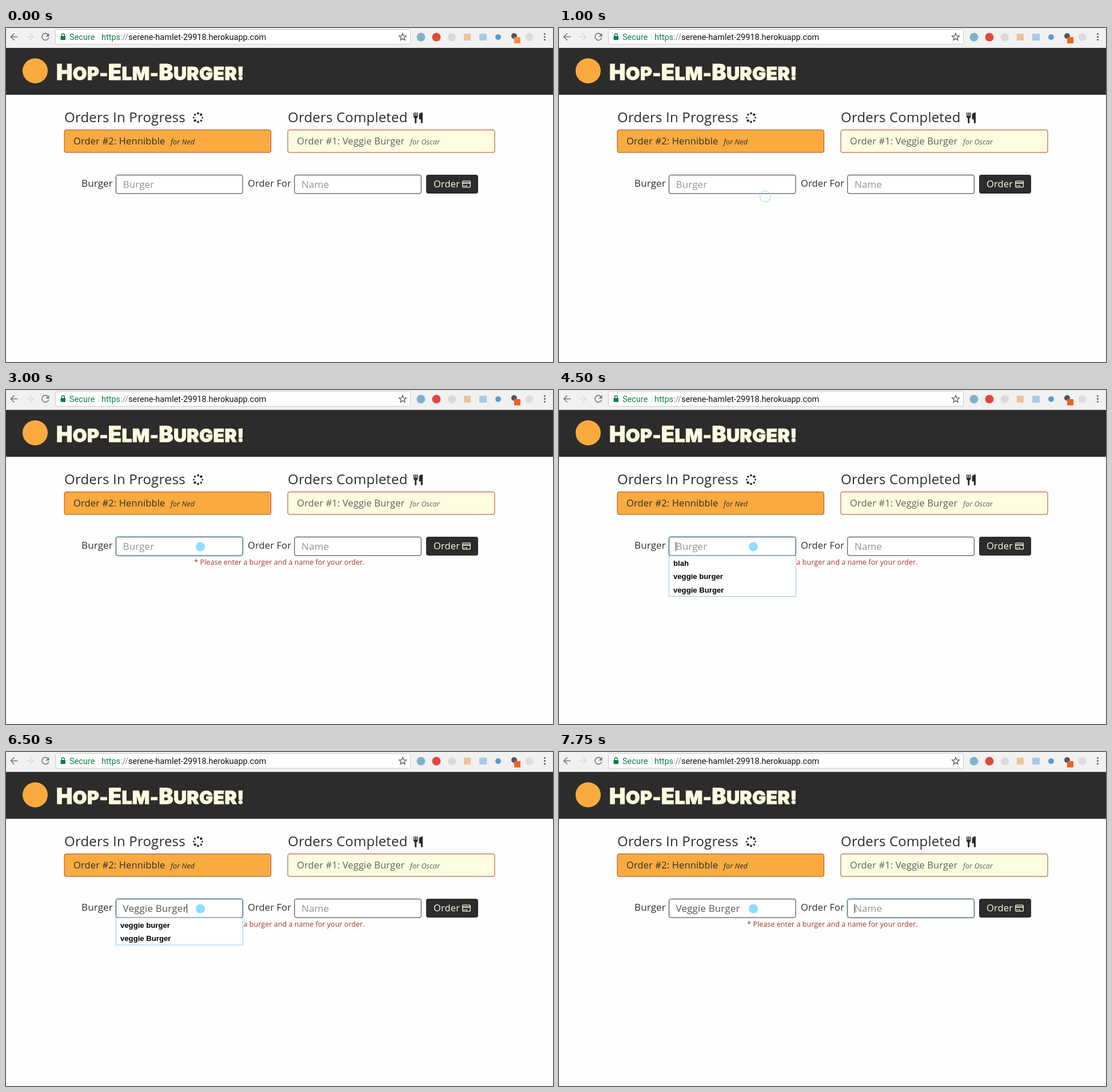
Recreate the animation shown at these times as an HTML page. Size 957 by 585 pixels, loop 8000 ms.

```html
<!DOCTYPE html>
<html lang="en">
<head>
<meta charset="utf-8">
<title>Burger orders</title>
<style>
  html, body { margin: 0; width: 100%; height: 100%; overflow: hidden; background: #fefefe; }
  svg { display: block; width: 957px; height: 585px; }
  text { font: 500 16.5px "Open Sans", "Noto Sans", sans-serif; letter-spacing: .008em; fill: #2c2c2c; }
  .url text { font: 14.5px Roboto, Arial, sans-serif; letter-spacing: 0; }
  .brand { font: 900 32px Inter, Roboto, sans-serif; letter-spacing: .01em; fill: #fdfbdf; stroke: #fdfbdf; stroke-width: .9; }
  .brand tspan { font-size: 38px; }
  .head { font-size: 24px; }
  .for { font-size: 12.5px; font-style: italic; }
  .field { font-size: 17px; }
  .hint { fill: #949494; }
  .error { font-size: 12.4px; fill: #a23328; text-anchor: middle; }
  .list text { font: bold 13.15px "Liberation Sans", Arial, sans-serif; letter-spacing: 0; fill: #000; }
  .input { fill: #fff; stroke: #2c2c2c; }
  .focus { stroke: #2b3d4d; filter: drop-shadow(0 0 2.2px rgba(102, 185, 233, .7)); }
  .line { fill: none; stroke: #737577; stroke-width: 1.6; }
</style>
</head>
<body>
<svg viewBox="0 0 957 585">
  <!-- browser bar -->
  <rect width="957" height="35" fill="#f1f1f1"/>
  <rect y="34" width="957" height="1" fill="#d2d2d2"/>
  <rect x="86.5" y="2.5" width="621" height="26" rx="3" fill="#fff" stroke="#cbcbcb"/>
  <path class="line" d="M20.5 15.5H9M14.5 9.5l-6 6 6 6"/>
  <path class="line" d="M35.5 15.5H47M41.5 9.5l6 6-6 6" style="stroke:#d9d9d9"/>
  <path class="line" d="M73.5 11.5a6 6 0 1 0 1.2 5.5"/>
  <path d="M75.5 9v6h-6z" fill="#737577"/>
  <rect x="95.5" y="14" width="8.5" height="7" rx="1" fill="#0b8043"/>
  <path d="M97.3 14v-1.5a2.500 2.500 0 0 1 5 0V14" fill="none" stroke="#0b8043" stroke-width="1.4"/>
  <g class="url">
    <text x="111" y="21" style="fill:#0b8043">Secure</text>
    <rect x="161.5" y="8" width="1" height="16" fill="#e2e2e2"/>
    <text x="167" y="21" style="fill:#111"><tspan fill="#0b8043">https</tspan><tspan fill="#8a8a8a">://</tspan>serene-hamlet-29918.herokuapp.com</text>
  </g>
  <path id="star" fill="none" stroke="#5f6163" stroke-width="1.4"/>
  <circle cx="726" cy="16" r="7.5" fill="#7fb0cc"/>
  <circle cx="753" cy="16" r="7.5" fill="#e0483e"/>
  <circle cx="780" cy="16" r="7" fill="#d9d9d9"/>
  <rect x="801" y="10" width="12" height="12" fill="#ecc396"/>
  <rect x="828" y="10" width="13" height="12" fill="#a9c8e6"/>
  <circle cx="861" cy="16" r="5" fill="#5b9ad6"/>
  <circle cx="889" cy="14" r="5" fill="#555"/>
  <rect id="badge" x="889" y="16" width="11" height="11"/>
  <circle cx="915.5" cy="16" r="7" fill="#dcdcdc"/>
  <g fill="#5f6163"><circle cx="942.5" cy="10.5" r="1.6"/><circle cx="942.5" cy="15.5" r="1.6"/><circle cx="942.5" cy="20.5" r="1.6"/></g>

  <!-- page header -->
  <rect y="35" width="957" height="82" fill="#2c2c2c"/>
  <circle cx="51" cy="75" r="22" fill="#fbab3e"/>
  <text class="brand" x="88" y="90.5"><tspan>H</tspan>OP-<tspan>E</tspan>LM-<tspan>B</tspan>URGER!</text>

  <!-- orders -->
  <text class="head" x="102" y="165">Orders In Progress</text>
  <g id="spinner" fill="#2c2c2c"></g>
  <text class="head" x="493" y="165">Orders Completed</text>
  <g fill="#2c2c2c">
    <path d="M713 148h1.6v6h1.2v-6h1.8v6h1.2v-6h1.6v7.500q0 2-2.200 2.600V165.500q0 1.500-1.500 1.500t-1.500-1.500V158.100q-2.200-.6-2.200-2.600z"/>
    <path d="M729 148v17.500q0 1.500-1.600 1.500t-1.600-1.500V160h-3.300v-7.500q0-4.500 6.500-4.500z"/>
  </g>
  <g stroke="#ae431f">
    <rect x="102" y="178.5" width="361.5" height="39.5" rx="3" fill="#f9ab3f"/>
    <rect x="493" y="178.5" width="362" height="39.5" rx="3" fill="#fcfce1"/>
  </g>
  <text x="118" y="203.5">Order #2: Hennibble</text>
  <text class="for" x="288" y="203.5">for Ned</text>
  <g opacity=".75">
    <text x="509" y="203.5">Order #1: Veggie Burger</text>
    <text class="for" x="707" y="203.5">for Oscar</text>
  </g>

  <!-- form -->
  <text class="field" x="132" y="278">Burger</text>
  <text x="423" y="278">Order For</text>
  <rect id="box1" class="input" x="192.5" y="257.5" width="221.5" height="32.5" rx="3"/>
  <rect id="box2" class="input" x="504.8" y="257.5" width="221.5" height="32.5" rx="3"/>
  <text id="hint" class="field hint" x="204.5" y="279.5">Burger</text>
  <text id="typed" class="field" x="204.5" y="279.5" style="fill:#555"></text>
  <text class="field hint" x="517" y="279.5">Name</text>
  <rect x="735" y="257" width="91" height="33" rx="4" fill="#2c2c2c"/>
  <text x="748" y="279" style="fill:#fdfbdf">Order</text>
  <rect x="798.7" y="268.2" width="13.6" height="10.6" rx="1" fill="none" stroke="#fdfbdf" stroke-width="1.3"/>
  <path d="M798.5 271.5h14M800.5 276.3h2M804 276.3h3" stroke="#fdfbdf" stroke-width="1.8"/>
  <text id="error" class="error" x="478.5" y="305.5">* Please enter a burger and a name for your order.</text>

  <!-- suggestions, caret and pointer -->
  <g id="list" class="list">
    <rect id="frame" x="192.5" y="290.5" width="222" fill="#fff" stroke="#9cc5ee"/>
    <text x="200" y="308"></text>
    <text x="200" y="331.3"></text>
    <text x="200" y="354.6"></text>
  </g>
  <rect id="caret" y="266" width="1" height="16" fill="#222"/>
  <circle id="ring" r="9.5" fill="none" stroke="#9fdcfb" stroke-width="1.5"/>
  <circle id="dot" r="8" fill="#8fdcff"/>
</svg>
<script>
const $ = id => document.getElementById(id);
const LOOP = 8000, STEP = 250;
const WORD = 'Veggie Burger';
const ITEMS = ['blah', 'veggie burger', 'veggie Burger'];

// Each row overrides the state from its time onwards.
const START = { badge: '#f98d45', x: 361, y: 295, ring: 0, dot: 0, focus: 0, caret: 0, error: 0, items: 0, typed: 0 };
const ROWS = [
  [250, { badge: '#f2621f' }],
  [750, { x: 368, ring: .4 }],
  [1000, { x: 361, ring: .75 }],
  [1250, { x: 355, ring: .7 }],
  [1500, { x: 348, y: 294, ring: .55 }],
  [1750, { x: 341, ring: .4, focus: 1 }],
  [2000, { x: 336, ring: .25 }],
  [2250, { x: 338, y: 283, ring: 0, dot: .6, error: .5 }],
  [2500, { x: 340, y: 274.5, dot: 1, error: 1, caret: 1 }],
  [3000, { caret: 0 }],
  [3500, { caret: 1 }],
  [3750, { items: 3 }],
  [4000, { caret: 0 }],
  [4500, { caret: 1 }],
  [5000, { items: 2, typed: 1 }],
  [5250, { typed: 3 }],
  [5500, { typed: 5 }],
  [5750, { typed: 7 }],
  [6000, { typed: 9 }],
  [6250, { typed: 11 }],
  [6500, { typed: 13 }],
  [7000, { items: 0, focus: 2 }],
  [7500, { caret: 0 }],
  [7750, { caret: 1 }]
];

const stateAt = t => Object.assign({}, START, ...ROWS.filter(r => r[0] <= t).map(r => r[1]));

function drawIcons() {
  let star = '';
  for (let i = 0; i < 10; i++) {
    const a = i * Math.PI / 5 - Math.PI / 2, r = i % 2 ? 2.9 : 6.6;
    star += `${i ? 'L' : 'M'}${694 + r * Math.cos(a)} ${16 + r * Math.sin(a)}`;
  }
  $('star').setAttribute('d', star + 'z');
  let dots = '';
  for (let i = 0; i < 8; i++) {
    const a = i * Math.PI / 4;
    dots += `<circle cx="${336 + 7.6 * Math.cos(a)}" cy="${157 + 7.6 * Math.sin(a)}" r="${1.5 + i % 4 * .25}"/>`;
  }
  $('spinner').innerHTML = dots;
}

function show(id, alpha) { $(id).style.opacity = alpha; }

function render(t) {
  const s = stateAt(t);
  $('badge').setAttribute('fill', s.badge);
  for (const id of ['ring', 'dot']) {
    $(id).setAttribute('cx', s.x);
    $(id).setAttribute('cy', s.y);
    show(id, s[id]);
  }
  $('box1').classList.toggle('focus', s.focus === 1);
  $('box2').classList.toggle('focus', s.focus === 2);

  $('typed').textContent = WORD.slice(0, s.typed);
  show('hint', s.typed ? 0 : 1);
  const end = s.typed ? $('typed').getComputedTextLength() : 0;
  $('caret').setAttribute('x', s.focus === 2 ? 516.5 : 204 + end);
  show('caret', s.caret);
  show('error', s.error);

  show('list', s.items ? 1 : 0);
  $('frame').setAttribute('height', s.items * 23.5 + .5);
  const items = s.items ? ITEMS.slice(-s.items) : [];
  $('list').querySelectorAll('text').forEach((el, i) => { el.textContent = items[i] || ''; });
}

let last = -1;
function tick() {
  const t = Math.floor(performance.now() % LOOP / STEP) * STEP;
  if (t !== last) render(last = t);
  requestAnimationFrame(tick);
}

drawIcons();
tick();
</script>
</body>
</html>
```
